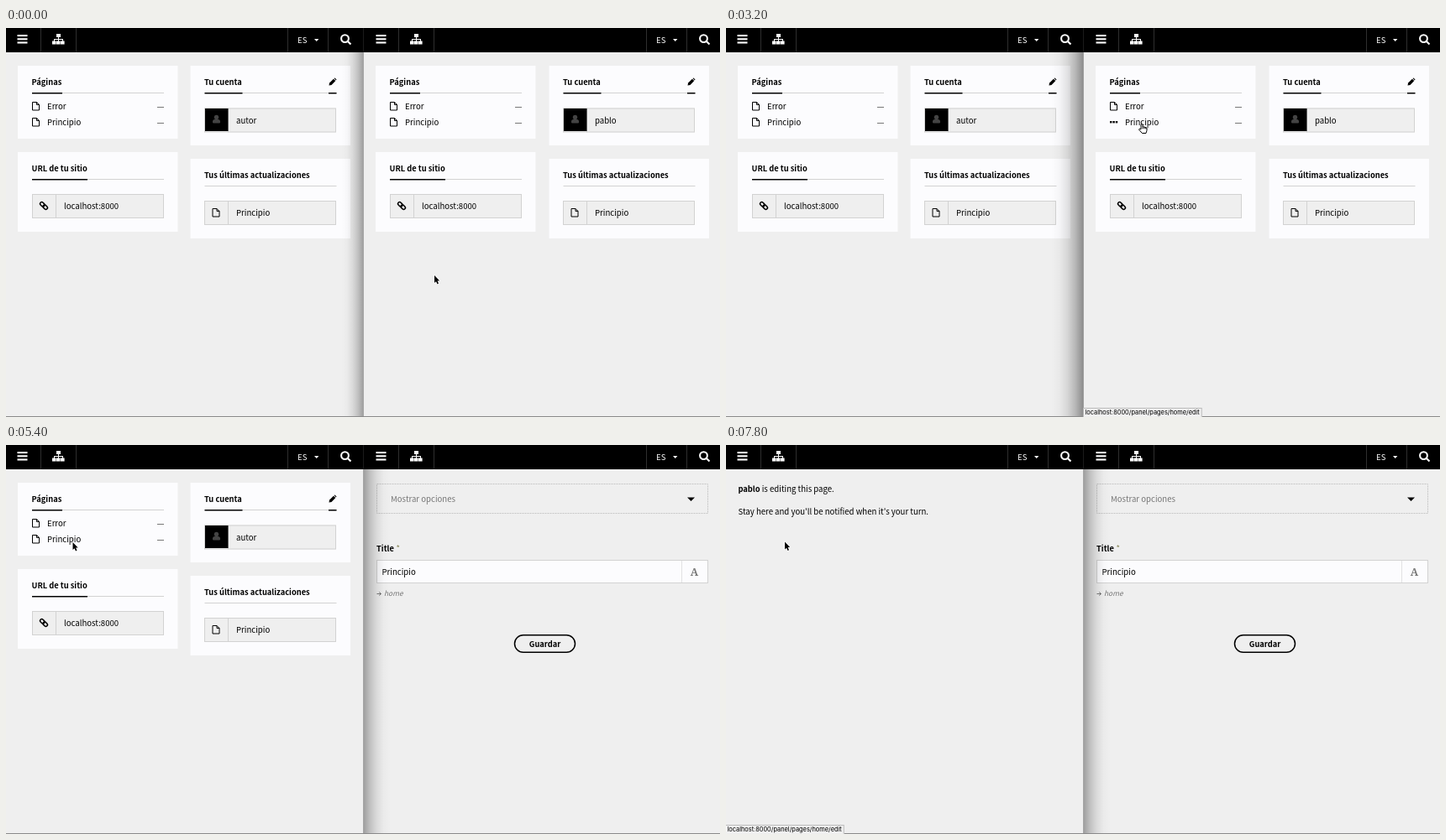
An HTML page with a canvas that plays this animation: 850 by 464 pixels, repeating every 8000 ms.

```html
<!DOCTYPE html>
<html lang="es">
<head>
<meta charset="utf-8">
<style>
  html, body { margin: 0; width: 100%; height: 100%; overflow: hidden; background: #efefef; }
  canvas { display: block; }
</style>
</head>
<body>
<canvas id="stage" width="850" height="464"></canvas>
<script>
const ctx = document.getElementById('stage').getContext('2d');
const LOOP = 8000, STEP = 200;
const INK = '#000', PAPER = '#fcfcfe', GROUND = '#efefef', LINE = '#d2d2d2', DIM = '#777', PALE = '#fcfcfc';
const SANS = '"Noto Sans CJK JP", "Noto Sans CJK SC", "Noto Sans CJK", "Open Sans", sans-serif';
const BODY = `9.6px ${SANS}`, BOLD = `bold 9.3px ${SANS}`, SMALL = '7.4px Inter, sans-serif';
const USERS = ['autor', 'pablo'];
const HOME_URL = 'localhost:8000/panel/pages/home/edit';
const USER_URL = `localhost:8000/panel/users/${USERS[1]}/edit`;

// Pointer stops: time, x, y
const PATH = [
  [0, 510, 295], [900, 775, 114], [1400, 694, 114], [1800, 702, 106], [2400, 493, 114],
  [3400, 493, 114], [4770, 79.5, 116], [6000, 79.5, 116], [6400, 70, 115.5]
];

const within = (t, from, to) => t >= from && t < to;

function rect(x, y, w, h, color) {
  ctx.fillStyle = color;
  ctx.fillRect(x, y, w, h);
}

function text(str, x, y, font = BODY, color = INK, align = 'left') {
  ctx.font = font;
  ctx.fillStyle = color;
  ctx.textAlign = align;
  ctx.fillText(str, x, y);
}

function frame(x, y, w, h, color = LINE, dash = []) {
  ctx.strokeStyle = color;
  ctx.lineWidth = 1;
  ctx.setLineDash(dash);
  ctx.strokeRect(x + .5, y + .5, w - 1, h - 1);
  ctx.setLineDash([]);
}

function poly(points, fill, stroke, width = 1) {
  ctx.beginPath();
  points.forEach(([x, y]) => ctx.lineTo(x, y));
  ctx.closePath();
  if (stroke) {
    ctx.strokeStyle = stroke;
    ctx.lineWidth = width;
    ctx.lineJoin = 'round';
    ctx.stroke();
  }
  if (fill) {
    ctx.fillStyle = fill;
    ctx.fill();
  }
}

function caret(x, y, w, h, color) {
  poly([[x, y], [x + w, y], [x + w / 2, y + h]], color);
}

function at(x, y, draw) {
  ctx.save();
  ctx.translate(x, y);
  draw();
  ctx.restore();
}

function docIcon(x, y) {
  at(x, y, () => {
    poly([[.5, .5], [5.5, .5], [8.5, 3.5], [8.5, 10], [.5, 10]], null, INK);
    ctx.beginPath();
    ctx.moveTo(5.5, .5);
    ctx.lineTo(5.5, 3.5);
    ctx.lineTo(8.5, 3.5);
    ctx.stroke();
  });
}

function dotsIcon(x, y) {
  for (let i = 0; i < 3; i++) rect(x + i * 3.4, y, 2.4, 2.4, INK);
}

function linkIcon(x, y) {
  at(x, y, () => {
    ctx.rotate(Math.PI / 4);
    ctx.strokeStyle = INK;
    ctx.lineWidth = 1.5;
    for (const left of [-5.4, -.6]) {
      ctx.beginPath();
      ctx.roundRect(left, -2, 6, 4, 2);
      ctx.stroke();
    }
  });
}

function pencilIcon(x, y) {
  at(x, y, () => {
    poly([[0, 9], [.6, 6], [5.4, 1.2], [7.8, 3.6], [3, 8.4]], INK);
    poly([[6, .6], [7, 0], [9, 2], [8.4, 3]], INK);
  });
}

function userIcon(x, y) {
  ctx.fillStyle = '#444';
  ctx.beginPath();
  ctx.arc(x, y - 2.6, 2.7, 0, 7);
  ctx.fill();
  ctx.beginPath();
  ctx.roundRect(x - 4.5, y, 9, 4.6, [2.5, 2.5, 1, 1]);
  ctx.fill();
}

function sitemapIcon(x, y) {
  rect(x + 5, y, 5, 4, PALE);
  rect(x + 7, y + 4, 1, 5, PALE);
  rect(x + 2, y + 6, 11, 1, PALE);
  for (const dx of [0, 5, 10]) {
    rect(x + dx + 2, y + 6, 1, 3, PALE);
    rect(x + dx, y + 8.5, 4.6, 4, PALE);
  }
}

function searchIcon(x, y) {
  ctx.strokeStyle = PALE;
  ctx.lineWidth = 2.1;
  ctx.beginPath();
  ctx.arc(x, y, 4.4, 0, 7);
  ctx.moveTo(x + 3.2, y + 3.2);
  ctx.lineTo(x + 7, y + 7);
  ctx.stroke();
}

// The two column groups sit one pixel apart in the right window
function header(a, b) {
  for (let i = 0; i < 3; i++) rect(b + 13.5, 8 + i * 4.2, 12, 2.1, PALE);
  sitemapIcon(a + 55, 7);
  for (const x of [a + 41, a + 83, b + 335, b + 383]) rect(x, 0, 1, 29, '#2e2e2e');
  text('ES', b + 347, 17.5, BODY, PALE);
  caret(b + 367, 13, 5.4, 3, PALE);
  searchIcon(b + 403.5, 12.6);
}

function widget(x, y, h, title, mark) {
  rect(x, y, 190.5, h, PAPER);
  text(title, x + 16.5, y + 23, BOLD);
  rect(x + 17, y + 32, 157, 1, LINE);
  if (mark) rect(x + 17, y + 32, mark, 1.5, INK);
}

function field(x, y, label) {
  rect(x, y, 157, 29, GROUND);
  frame(x, y, 157, 29);
  rect(x + 28, y, 1, 29, LINE);
  text(label, x + 38, y + 18);
}

function dashboard(a, b, user, loading) {
  widget(a + 14, 45, 87, 'Páginas', 36);
  docIcon(a + 31, 88);
  if (loading) dotsIcon(a + 31, 111);
  else docIcon(a + 31, 107);
  text('Error', a + 49, 97);
  text('Principio', a + 49, 116);
  rect(a + 180, 94, 8, 1, DIM);
  rect(a + 180, 113, 8, 1, DIM);

  widget(a + 14, 148, 95, 'URL de tu sitio', 66);
  field(a + 31, 198, 'localhost:8000');
  linkIcon(a + 45, 212);

  widget(b + 219.5, 45, 95, 'Tu cuenta', 45);
  pencilIcon(b + 384.5, 59.5);
  rect(b + 384, 77, 9.5, 1.5, INK);
  field(b + 236, 95.5, user);
  rect(b + 237, 96, 27.5, 27, INK);
  userIcon(b + 250.5, 109);

  widget(b + 219.5, 156, 95, 'Tus últimas actualizaciones');
  field(b + 236, 206, 'Principio');
  docIcon(b + 245.5, 215);
}

function form() {
  frame(441, 46, 395, 36, '#c6c6c6', [2, 1]);
  text('Mostrar opciones', 458, 68, BODY, DIM);
  caret(811, 62.5, 9, 4.6, INK);
  text('Title', 441, 127, BOLD);
  text('*', 464.5, 127, BODY, '#8c8a5c');
  rect(441, 137, 395, 28, PAPER);
  frame(441, 137, 395, 28);
  rect(804, 138, 1, 26, '#e2e2e2');
  text('Principio', 447.5, 155);
  text('A', 819.5, 155.5, 'bold 12.5px "Noto Serif", serif', DIM, 'center');
  ctx.strokeStyle = DIM;
  ctx.lineWidth = 1;
  ctx.beginPath();
  ctx.moveTo(441.5, 177.5);
  ctx.lineTo(446.5, 177.5);
  ctx.moveTo(444.3, 175.3);
  ctx.lineTo(446.5, 177.5);
  ctx.lineTo(444.3, 179.7);
  ctx.stroke();
  text('home', 450, 180, `italic 8.4px ${SANS}`, DIM);
  ctx.strokeStyle = INK;
  ctx.lineWidth = 1.5;
  ctx.beginPath();
  ctx.roundRect(605.5, 226.7, 72, 20.6, 10.3);
  ctx.stroke();
  text('Guardar', 641.5, 241, BOLD, INK, 'center');
}

function notice() {
  text(USERS[1], 14.5, 56, BOLD);
  const w = ctx.measureText(USERS[1]).width;
  text(' is editing this page.', 14.5 + w, 56);
  text("Stay here and you'll be notified when it's your turn.", 14.5, 83);
}

// Shadow cast from the window edge; a negative reach falls to the left
function shadow(reach, alpha) {
  const edge = 425.5;
  const g = ctx.createLinearGradient(edge, 0, edge + reach, 0);
  for (const k of [0, .25, .5, .75, 1]) {
    g.addColorStop(k, `rgba(0,0,0,${alpha * (1 - k) ** 2})`);
  }
  rect(Math.min(edge, edge + reach), 29, Math.abs(reach), 435, g);
}

function status(x, url) {
  ctx.font = SMALL;
  const w = ctx.measureText(url).width + 4.5;
  rect(x, 453, w, 11, '#f0f0f0');
  frame(x - 1, 453, w + 1, 12, '#bbb');
  text(url, x + 1.5, 461.3, SMALL);
}

function pointer(t) {
  let i = PATH.findIndex(p => p[0] > t);
  if (i < 0) i = PATH.length;
  const from = PATH[Math.max(0, i - 1)], to = PATH[Math.min(i, PATH.length - 1)];
  const k = to === from ? 0 : (t - from[0]) / (to[0] - from[0]);
  const e = k * k * (3 - 2 * k);
  return [from[1] + (to[1] - from[1]) * e, from[2] + (to[2] - from[2]) * e];
}

function arrow() {
  poly([[0, 0], [0, 9], [2, 7.2], [3.5, 10.4], [5, 9.7], [3.6, 6.6], [6.2, 6.4]], INK, '#fff', 1.6);
}

function hand() {
  ctx.beginPath();
  ctx.moveTo(1, 6.8);
  ctx.lineTo(1, 1);
  ctx.quadraticCurveTo(2, -.4, 3, 1);
  ctx.lineTo(3, 4);
  ctx.quadraticCurveTo(4.2, 3.2, 5, 4.3);
  ctx.quadraticCurveTo(6.2, 3.7, 6.8, 4.8);
  ctx.quadraticCurveTo(8, 4.6, 8.1, 6);
  ctx.quadraticCurveTo(8.2, 8.6, 7, 11.5);
  ctx.lineTo(2.4, 11.5);
  ctx.lineTo(-1.4, 7.2);
  ctx.quadraticCurveTo(-1.4, 5.4, 1, 6.8);
  ctx.fillStyle = '#fff';
  ctx.fill();
  ctx.strokeStyle = INK;
  ctx.lineWidth = 1;
  ctx.stroke();
  for (const x of [3, 5, 6.8]) {
    ctx.beginPath();
    ctx.moveTo(x, 4.3);
    ctx.lineTo(x, 6.3);
    ctx.stroke();
  }
}

function draw(t) {
  rect(0, 0, 850, 464, GROUND);
  rect(0, 0, 850, 29, INK);
  header(0, 0);
  header(426, 427);

  if (t < 6200) dashboard(0, 0, USERS[0], within(t, 5800, 6200));
  else notice();
  if (t < 3400) dashboard(426, 427, USERS[1], within(t, 3000, 3400));
  else form();

  if (t < 200) shadow(-26, .34);
  else if (t < 5200) shadow(-38, .42);
  else shadow(32, .34);
  rect(425, 0, 1, 464, 'rgba(90,90,90,.3)');
  rect(0, 463, 850, 1, '#8a8a8a');

  const onUser = within(t, 800, 2000);
  const onRightPage = within(t, 2400, 3400);
  if (onUser) status(426, USER_URL);
  if (onRightPage) status(426, HOME_URL);
  if (t >= 5600) status(0, HOME_URL);

  const onLink = onUser || onRightPage || within(t, 5600, 6200);
  at(...pointer(t), onLink ? hand : arrow);
}

function tick(now) {
  draw(Math.floor(now % LOOP / STEP) * STEP);
  requestAnimationFrame(tick);
}
requestAnimationFrame(tick);
</script>
</body>
</html>
```
